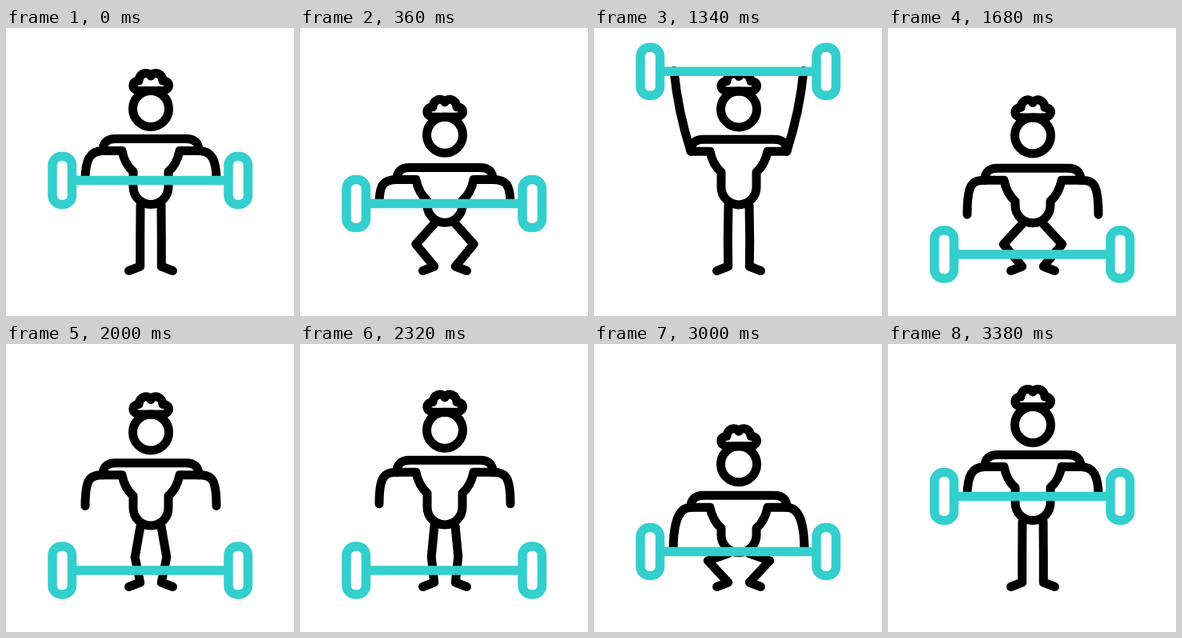
Write an HTML page that moves like this. It is 360 px wide and 360 px high and loops after 3.6 s.

```html
<!DOCTYPE html>
<html lang="en">
<head>
<meta charset="utf-8">
<title>Weightlifter</title>
<style>
  html, body { margin: 0; width: 100%; height: 100%; overflow: hidden; background: #fff; }
  svg { display: block; width: 100%; height: 100%; }
</style>
</head>
<body>
<svg viewBox="0 0 360 360" fill="none" stroke="#000" stroke-width="11" stroke-linecap="round" stroke-linejoin="round">
  <path id="legL"/><path id="legR"/>
  <path id="torso"/>
  <path id="armL"/><path id="armR"/>
  <path id="shoulders" d="M121 153.5Q121 138.5 137 138.5H225Q241 138.5 241 153.5"/>
  <g id="head">
    <circle cx="181" cy="101" r="22.5"/>
    <path d="M166 78.5C156 77 157 66 166 66C166 57 177 53 181 60C185 53 196 57 196 66C206 66 206 77 196 78.5Z"/>
  </g>
  <g id="bar" stroke="#34cfcd" stroke-width="11.5">
    <path d="M83 0H278" stroke-linecap="butt"/>
    <rect x="58" y="-30" width="24.5" height="60" rx="11"/>
    <rect x="278" y="-30" width="24.5" height="60" rx="11"/>
  </g>
</svg>
<script>
const LOOP = 3600;
const REST = 190.5;    // bar height when standing
const ARMPIT = 153.5;

// Moments where one movement hands over to the next
const DIP = 318, TOP = 635, RELEASE = 1318, LAND = 1620, UPRIGHT = 2200, GRIP = 2815, DONE = 3380;

const el = id => document.getElementById(id);
const mix = (a, b, u) => a + (b - a) * u;
const shift = (id, y) => el(id).setAttribute("transform", `translate(0 ${y})`);

function ramp(t, from, to) {
  const u = Math.min(1, Math.max(0, (t - from) / (to - from)));
  return u * u * (3 - 2 * u);
}

// Rises over a..b, stays, falls over c..d
const pulse = (t, a, b, c, d) => ramp(t, a, b) - ramp(t, c, d);

function poseAt(t) {
  const dip = pulse(t, 0, DIP, DIP, TOP);
  const press = pulse(t, DIP, TOP, RELEASE, LAND);
  const land = pulse(t, RELEASE, LAND, LAND, UPRIGHT);
  const floor = pulse(t, RELEASE, LAND, GRIP, DONE);
  const grab = pulse(t, UPRIGHT, GRIP, GRIP, DONE);
  const crouch = dip + land;
  const held = REST + 38 * dip - 140 * press;
  return {
    press,
    bar: held + 92.5 * floor,
    hand: held + 44 * land + 92.5 * grab,
    head: 34.5 * crouch + 66 * grab,
    chest: 38 * crouch + 68 * grab,
    hip: 24 * crouch + 54 * grab,
    knee: 24 * crouch + 34 * grab,
    bend: 0.3 - 0.2 * (dip + floor) + 0.3 * grab
  };
}

// Builds a path on one side; side "R" mirrors it about x = 181
function limb(name, side, cmds) {
  const x = v => side === "R" ? 362 - v : v;
  el(name + side).setAttribute("d",
    cmds.map(([c, ...pts]) => c + pts.map((v, i) => i % 2 ? v : x(v)).join(" ")).join(""));
}

function draw(t) {
  const p = poseAt(t);
  const s = ARMPIT + p.chest;
  const reach = p.hand - s;
  const seat = 198.5 + p.hip;

  shift("bar", p.bar);
  shift("head", p.head);
  shift("shoulders", p.chest);

  el("torso").setAttribute("d",
    `M122 ${s}H145C147 ${s + 10} 152 ${s + 20} 159 ${s + 26}V${seat}` +
    `A22 22 0 0 0 203 ${seat}V${s + 26}C210 ${s + 20} 215 ${s + 10} 217 ${s}H240`);

  for (const side of ["L", "R"]) {
    limb("arm", side, [
      ["M", 121, s],
      ["C", mix(105, 112.5, p.press), s + 0.27 * p.press * reach,
            mix(99, 103.5, p.press), s + mix(p.bend, 0.65, p.press) * reach,
            mix(99, 100, p.press), p.hand]
    ]);
    limb("leg", side, [
      ["M", 168, 221.5 + p.hip],
      ["L", 167.7 - p.knee, 265 + p.knee * 0.23],
      ["L", 167.7, 298],
      ["L", 153.5, 303.5]
    ]);
  }
}

function tick(now) {
  draw(now % LOOP);
  requestAnimationFrame(tick);
}
draw(0);
requestAnimationFrame(tick);
</script>
</body>
</html>
```
